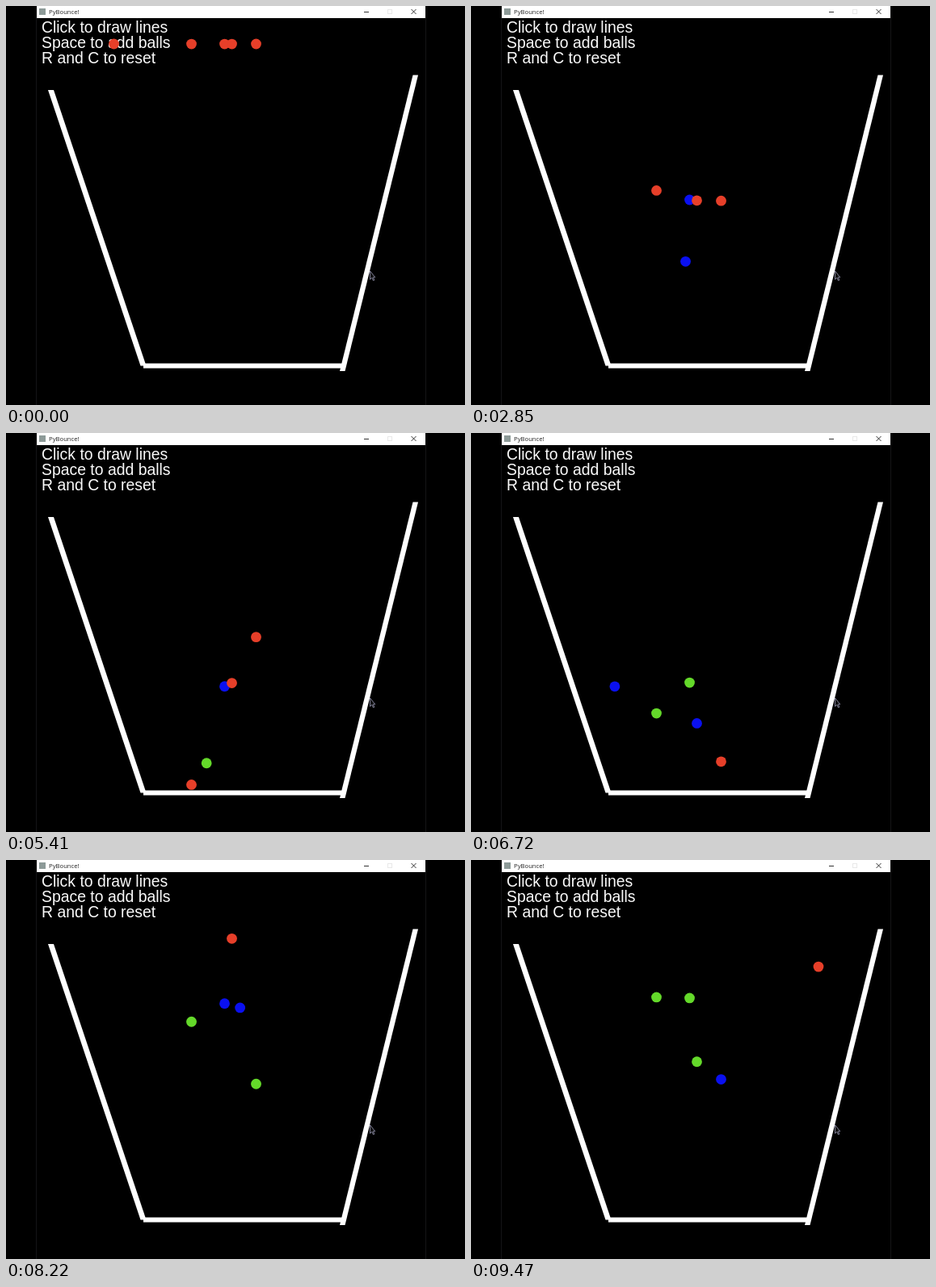
An HTML page for the animation above (9510 ms loop, 568x494 px).

```html
<!DOCTYPE html>
<html lang="en">
<head>
<meta charset="utf-8">
<title>Bouncing balls</title>
<style>
  html, body { margin: 0; width: 100%; height: 100%; overflow: hidden; background: #000; }
  svg { display: block; width: 568px; height: 494px; }
  .help { font: 19.4px "Liberation Sans", Arial, sans-serif; fill: #fafafa; }
  .title { font: 7.7px "Open Sans", "Noto Sans", sans-serif; fill: #222; }
</style>
</head>
<body>
<svg viewBox="0 0 568 494">
  <path d="M37.5 15V494M519.5 15V494" stroke="#141416"/>
  <rect x="38" width="481" height="15" fill="#fff"/>
  <rect x="41" y="3" width="8" height="8" fill="#8d9a98"/>
  <text class="title" x="53" y="9.600">PyBounce!</text>
  <g fill="none" stroke="#333">
    <path d="M443 7.500h6M501.500 4l6 6m0-6l-6 6"/>
    <rect x="472.500" y="4.500" width="5" height="5" stroke="#e9e9e9"/>
  </g>
  <g class="help">
    <text x="44" y="33">Click to draw lines</text>
    <text x="44" y="52">Space to add balls</text>
    <text x="44" y="71">R and C to reset</text>
  </g>
  <g fill="#fff">
    <path d="M52 104h7l114.500 341.500h-7z"/>
    <path d="M503.500 85.500h6.500l-90.500 366.500h-6.500z"/>
    <path d="M170 442.500h247v6h-247z"/>
  </g>
  <g id="balls" transform="translate(.5)"></g>
  <path d="M450.500 328v10.500l2.300-2 1.700 3.500 1.300-.7-1.600-3.300h2.600z" fill="#111" stroke="#8c8ca4" stroke-width=".9"/>
</svg>
<script>
const LOOP = 9.51, FLOOR = 436, HALF_GRAVITY = 78;
const SPEEDUP_AT = 5.41, SPEEDUP = 3.1;
const COLORS = { o: '#e63f29', b: '#0a10f0', g: '#64d92a' };

// Contacts are [world time, colour afterwards, y, x]; between them a ball flies freely.
const drop = (x, ...contacts) =>
  [[0, 'o', 47, x], ...contacts.map(([t, color, y = FLOOR, cx = x]) => [t, color, y, cx])];

const paths = [
  drop(133, [1.857, 'b', 316], [2.32, 'b', FLOOR, 195], [4.365, 'g', 216.5, 464.7],
    [5.513, 'g', FLOOR, 227], [5.93, 'b', 347, 146], [8.8, 'b', FLOOR, 172],
    [11.798, 'b', FLOOR, 196], [15.519, 'o', FLOOR, 345], [19.57, 'o', FLOOR, 483]),
  drop(229, [1.829, 'o'], [4.14, 'o', 199], [5.415, 'g'], [9.127, 'g'], [12.76, 'g'],
    [16.34, 'g'], [20.055, 'g']),
  drop(270, [2.02, 'b'], [5.875, 'g'], [8.971, 'g'], [12.709, 'b'], [16.464, 'g'], [20.213, 'g']),
  drop(279, [1.994, 'o'], [4.14, 'o', 163], [5.912, 'b'], [9.15, 'b'], [12.504, 'o'],
    [16.804, 'g'], [19.997, 'g']),
  drop(309, [2.087, 'o'], [6.12, 'o'], [9.38, 'o'], [13.449, 'g'], [17.139, 'b'], [20.45, 'b'])
];

const group = document.getElementById('balls');
const circles = paths.map(() => {
  const circle = document.createElementNS(group.namespaceURI, 'circle');
  circle.setAttribute('r', 6.4);
  return group.appendChild(circle);
});

function ballAt(path, time) {
  const next = path.findIndex(contact => contact[0] > time);
  const [t0, color, y0, x0] = path[next - 1];
  const [t1, , y1, x1] = path[next];
  const u = (time - t0) / (t1 - t0);
  return {
    cx: x0 + (x1 - x0) * u,
    cy: y0 + (y1 - y0) * u - HALF_GRAVITY * (time - t0) * (t1 - time),
    fill: COLORS[color]
  };
}

const start = performance.now();
function draw() {
  const t = (performance.now() - start) / 1000 % LOOP;
  const worldTime = t + Math.max(0, t - SPEEDUP_AT) * (SPEEDUP - 1);
  paths.forEach((path, i) => {
    for (const [name, value] of Object.entries(ballAt(path, worldTime))) {
      circles[i].setAttribute(name, value);
    }
  });
  requestAnimationFrame(draw);
}
draw();
</script>
</body>
</html>
```
